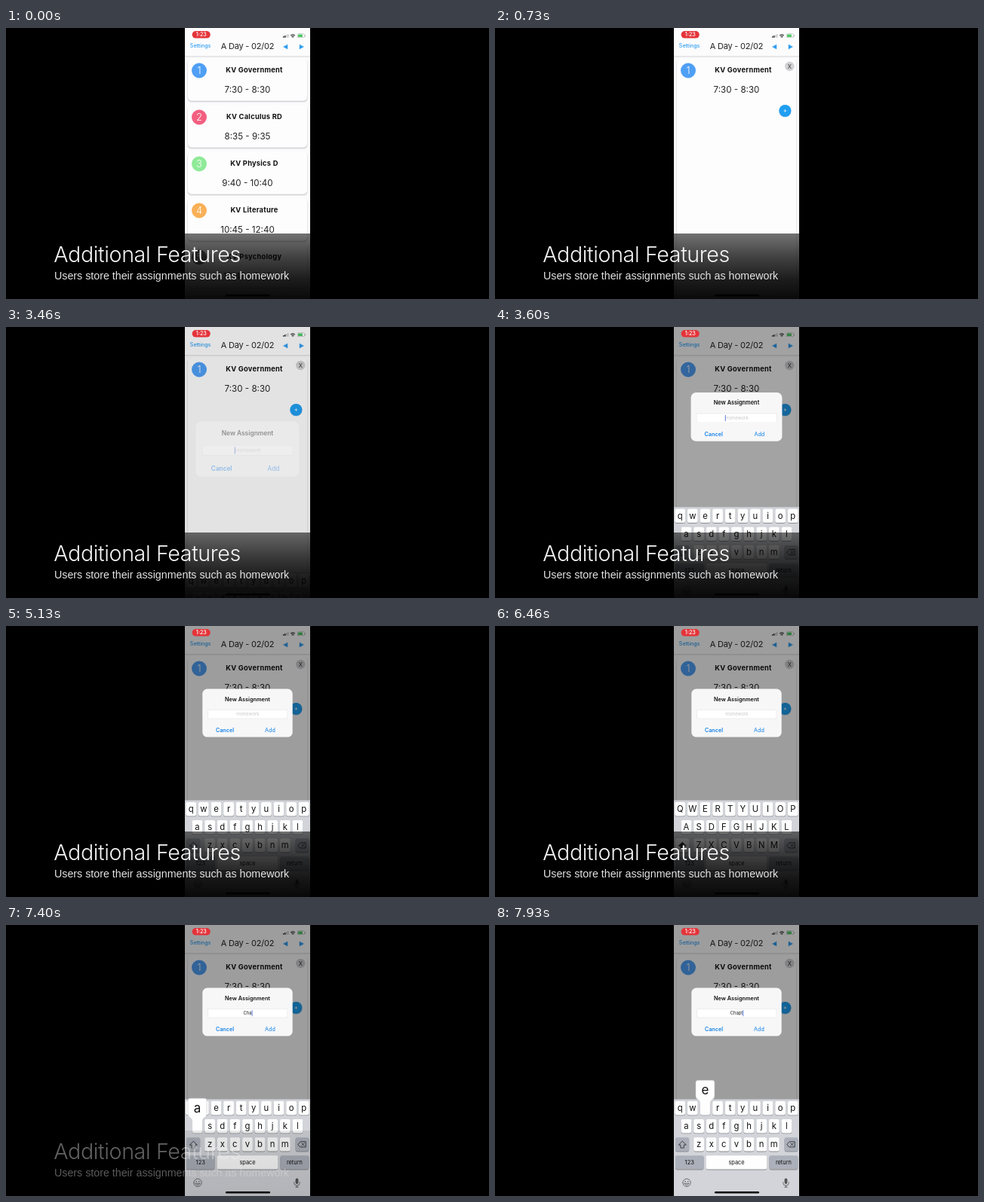
Animation, 640 px wide and 360 px high, one loop 8000 ms. Source, as an HTML page:

```html
<!DOCTYPE html>
<html lang="en">
<head>
<meta charset="utf-8">
<title>Planner demo</title>
<style>
html, body { margin: 0; width: 100%; height: 100%; overflow: hidden; background: #000; }
svg { display: block; width: 100vw; height: 100vh; font-family: Inter, Roboto, sans-serif; }
.mid { text-anchor: middle; }
</style>
</head>
<body>
<svg id="stage" viewBox="0 0 640 360">
  <defs>
    <clipPath id="screen"><rect x="237" width="166" height="360"/></clipPath>
    <linearGradient id="shade" x1="0" y1="0" x2="0" y2="1">
      <stop offset="0" stop-opacity=".55"/>
      <stop offset=".38" stop-opacity=".75"/>
      <stop offset=".7" stop-opacity=".89"/>
      <stop offset="1" stop-opacity=".96"/>
    </linearGradient>
  </defs>
  <rect width="640" height="360"/>
  <g clip-path="url(#screen)">
    <rect x="237" width="166" height="360" fill="#fbfbfc"/>
    <g id="list"></g>
    <g id="header"></g>
    <rect id="dim" x="237" width="166" height="360" opacity="0"/>
    <g id="pill"></g>
    <g id="dialog"></g>
    <g id="keyboard"></g>
    <rect x="291" y="354" width="59" height="2.4" rx="1.2"/>
  </g>
  <g id="caption">
    <rect id="veil" x="0" y="273" width="640" height="87" fill="url(#shade)"/>
    <g id="words" fill="#f6f6f6">
      <text x="63.3" y="311" font-size="28.6" font-weight="300" letter-spacing="-.36">Additional Features</text>
      <text x="64" y="334" font-size="14.25" fill="#e4e4e4" font-family="Liberation Sans, Arial, sans-serif">Users store their assignments such as homework</text>
    </g>
  </g>
</svg>
<script>
const LOOP = 8000;
const $ = id => document.getElementById(id);
const BLUE = '#2b9bf0';

function add(parent, tag, attrs, text) {
  const el = document.createElementNS('http://www.w3.org/2000/svg', tag);
  for (const k in attrs) el.setAttribute(k, attrs[k]);
  if (text !== undefined) el.textContent = text;
  parent.appendChild(el);
  return el;
}
const box = (p, x, y, width, height, rx, fill) =>
  add(p, 'rect', { x, y, width, height, rx, fill });
const dot = (p, cx, cy, r, fill) => add(p, 'circle', { cx, cy, r, fill });
const label = (p, x, y, size, text, fill = '#111', weight = 400) =>
  add(p, 'text', { x, y, 'font-size': size, fill, 'font-weight': weight, class: 'mid' }, text);
const line = (p, d, stroke = '#222', width = .8, fill = 'none') =>
  add(p, 'path', { d, stroke, fill, 'stroke-width': width, 'stroke-linecap': 'round', 'stroke-linejoin': 'round' });
const set = (el, k, v) => el.setAttribute(k, v);

// Class list
const classes = [
  ['KV Government', '7:30 - 8:30', '#4f9ff5'],
  ['KV Calculus RD', '8:35 - 9:35', '#f35f80'],
  ['KV Physics D', '9:40 - 10:40', '#8fea98'],
  ['KV Literature', '10:45 - 12:40', '#f9b056'],
  ['KV Psychology', '12:45 - 1:45', '#666']
];
const rest = add($('list'), 'g', {});
const frames = [];
classes.forEach(([name, time, color], i) => {
  const g = add(i ? rest : $('list'), 'g', { transform: `translate(0 ${62 * i})` });
  frames.push([
    box(g, 240.2, 41.2, 159.6, 57.8, 5, '#ececef'),
    box(g, 240.7, 42, 158.6, 56, 5, '#d3d3d7'),
    box(g, 241, 40.8, 158, 56, 5, '#fdfdfe')
  ]);
  dot(g, 256, 56.5, 10, color);
  label(g, 256, 61.2, 13, i + 1, '#fff', 300);
  set(label(g, 329, 59.2, 9.3, name, '#111', 700), 'letter-spacing', .26);
  label(g, 320, 86.2, 11.6, time, '#222');
});
const detail = add($('list'), 'g', {});
dot(detail, 390.3, 51, 6.2, '#d2d2d4');
label(detail, 390.3, 53.8, 7.6, 'X', '#333');
dot(detail, 384.4, 110.4, 8.2, '#b9cfe0');
dot(detail, 384.4, 110, 8, '#1f9ff2');
line(detail, 'M382.9 110h3M384.4 108.5v3', '#fff', .7);

// Header and status bar
const head = $('header');
box(head, 237, 0, 166, 39.2, 0, '#eeeef0');
box(head, 237, 0, 166, 38, 0, '#e2e2e5');
box(head, 237, 0, 166, 37, 0, '#fcfcfd');
label(head, 257.6, 26.4, 7, 'Settings', BLUE, 500);
set(label(head, 320, 28, 11, 'A Day - 02/02', '#222'), 'letter-spacing', -.2);
line(head, 'M373 22.2v5.8l-5.4-2.9z', BLUE, .4, BLUE);
line(head, 'M389 22.2v5.8l5.4-2.9z', BLUE, .4, BLUE);
for (let i = 0; i < 4; i++)
  box(head, 367 + 2 * i, 11 - i, 1.4, 1.8 + i, .3, i < 2 ? '#222' : '#c4c4c6');
line(head, 'M377.3 9.6q2.7-2.4 5.4 0M378.5 11q1.5-1.2 3 0', '#222', 1);
dot(head, 380, 12.2, .7, '#222');
box(head, 386, 7.6, 9.6, 5.4, 1.5, '#aaa');
box(head, 386.5, 8.1, 8.6, 4.4, 1.1, '#fff');
box(head, 387, 8.6, 6, 3.4, .8, '#4cc964');
box(head, 396, 9.3, .9, 2, .4, '#aaa');
box($('pill'), 246.6, 4, 24.2, 9.6, 4.8, '#e4343a');
label($('pill'), 258.8, 11.4, 7.2, '1:23', '#fff', 500);

// Alert
const alertBox = $('dialog');
box(alertBox, 260.3, 83.6, 119.4, 64, 6.6, '#f7f7f8');
label(alertBox, 320, 99.5, 7.3, 'New Assignment', '#111', 600);
box(alertBox, 267.5, 111, 105.5, 12.2, 1, '#dededf');
box(alertBox, 267.9, 111.4, 104.7, 11.4, .8, '#fff');
const hint = label(alertBox, 320.4, 119.2, 5.9, 'Homework', '#c9c9cd');
const entry = label(alertBox, 320, 119.2, 5.9, '', '#222');
const caret = box(alertBox, 305, 113.2, .8, 8, 0, '#3b62d8');
label(alertBox, 290, 141, 7.2, 'Cancel', '#1482e8', 600);
label(alertBox, 350, 141, 7.2, 'Add', '#1482e8');

// Keyboard
const board = $('keyboard');
box(board, 237, 231.5, 166, 130, 0, '#d2d4d9');
const GREY = '#abb0ba';
function keycap(x, y, w, fill) {
  box(board, x, y + .8, w, 18.4, 2.3, '#8b8d92');
  return box(board, x, y, w, 18.4, 2.3, fill);
}
const STEP = 16.62;
const keys = {};
[['qwertyuiop', 245.2, 243.2], ['asdfghjkl', 253.5, 267.2], ['zxcvbnm', 270.1, 291.4]]
  .forEach(([row, x0, y]) => [...row].forEach((ch, i) => {
    const x = x0 + STEP * i;
    keycap(x - 6.9, y - 9.2, 13.8, '#fefefe');
    keys[ch] = { x, y, text: label(board, x, y + 4, 11.3, ch) };
  }));
const shiftCap = keycap(239, 282.2, 18.2, GREY);
const arrow = line(board, 'M248.1 287.4l-4.8 4.7h2.6v4h4.4v-4h2.6z');
keycap(383.6, 282.2, 17.8, GREY);
line(board, 'M387 291.4l3.2-3.6h7v7.2h-7zM391.8 289.7l3.4 3.4M395.2 289.7l-3.4 3.4');
keycap(239, 306.2, 37.6, GREY);
label(board, 257.8, 318.2, 7.6, '123');
keycap(279.4, 306.2, 81, '#fefefe');
label(board, 320, 318, 7.4, 'space');
keycap(363.4, 306.2, 38, GREY);
label(board, 382.4, 318, 7.4, 'return');
line(board, 'M248.8 342.3a5.2 5.2 0 1 0 10.4 0a5.2 5.2 0 1 0 -10.4 0M251 343.6q3 4 6 0z', '#555');
dot(board, 252.2, 340.8, .8, '#555');
dot(board, 255.8, 340.8, .8, '#555');
box(board, 383.6, 336.6, 3.8, 7.4, 1.9, '#555');
line(board, 'M381.7 341.6v.8a3.8 3.8 0 0 0 7.6 0v-.8M385.5 346.2v2M383.6 348.2h3.8', '#555');

const bubble = add(board, 'g', {});
line(bubble, 'M-9.5-37h19q3 0 3 3v18q0 3-2.8 4.6t-2.8 4.4V7q0 2.2-2.2 2.2h-9.4q-2.2 0-2.2-2.2V-7q0-2.8-2.8-4.4t-2.8-4.6v-18q0-3 3-3z', '#b9bbc0', .5, '#fefefe');
const bubbleText = label(bubble, 0, -18.6, 17, '');

// [key, pressed, released, character appears]
const presses = [
  ['c', 6910, 7000, 6985],
  ['h', 7050, 7160, 7130],
  ['a', 7330, 7430, 7400],
  ['p', 7530, 7630, 7600],
  ['t', 7735, 7835, 7810],
  ['e', 7895, 8000, 8000]
];
const WORD = 'Chapte';
const OPEN = 200, ALERT = 3420, SHIFT = [5600, 6985], FADE = [6980, 7480];

const spring = (t, k) => t <= 0 ? 0 : 1 - (1 + k * t) * Math.exp(-k * t);
const ramp = (t, a, b) => Math.min(1, Math.max(0, (t - a) / (b - a)));

let upper = null;
function draw(t) {
  // First class opens and pushes the rest away
  const open = spring(t - OPEN, .014);
  const [outer, edge, face] = frames[0];
  const grow = 275 * open;
  set(outer, 'height', 57.8 + grow);
  set(edge, 'height', 56 + grow);
  set(face, 'height', 56 + grow);
  set(rest, 'transform', `translate(0 ${grow})`);
  set(detail, 'opacity', ramp(open, .2, .9));

  // Alert and keyboard arrive together
  const p = spring(t - ALERT, .025);
  const s = 1 + .2 * (1 - p);
  set($('dim'), 'opacity', .38 * p);
  set(alertBox, 'opacity', ramp(p, 0, .7));
  set(alertBox, 'transform', `translate(320 ${115.6 + 64 * (1 - p)}) scale(${s}) translate(-320 -115.6)`);
  set(board, 'transform', `translate(0 ${129 * (1 - p)})`);

  const caps = t >= SHIFT[0] && t < SHIFT[1];
  if (caps !== upper) {
    upper = caps;
    for (const ch in keys) keys[ch].text.textContent = caps ? ch.toUpperCase() : ch;
    set(shiftCap, 'fill', caps ? '#fefefe' : GREY);
    set(arrow, 'fill', caps ? '#222' : 'none');
  }

  // Typing
  const typed = WORD.slice(0, presses.filter(k => t >= k[3]).length);
  if (entry.textContent !== typed) entry.textContent = typed;
  set(hint, 'opacity', typed ? 0 : 1);
  const half = typed ? entry.getComputedTextLength() / 2 : 0;
  set(caret, 'x', typed ? 320.1 + half : 305);
  set(caret, 'opacity', typed || (t - 3460) % 1050 < 530 ? 1 : 0);

  const down = presses.find(k => t >= k[1] && t < k[2]);
  set(bubble, 'opacity', down ? 1 : 0);
  if (down) {
    const key = keys[down[0]];
    set(bubble, 'transform', `translate(${key.x} ${key.y})`);
    bubbleText.textContent = caps ? down[0].toUpperCase() : down[0];
  }

  const left = 1 - ramp(t, ...FADE);
  set($('veil'), 'opacity', left);
  set($('words'), 'opacity', Math.sqrt(left));
}

const start = performance.now();
function tick() {
  draw((performance.now() - start) % LOOP);
  requestAnimationFrame(tick);
}
tick();
</script>
</body>
</html>
```
